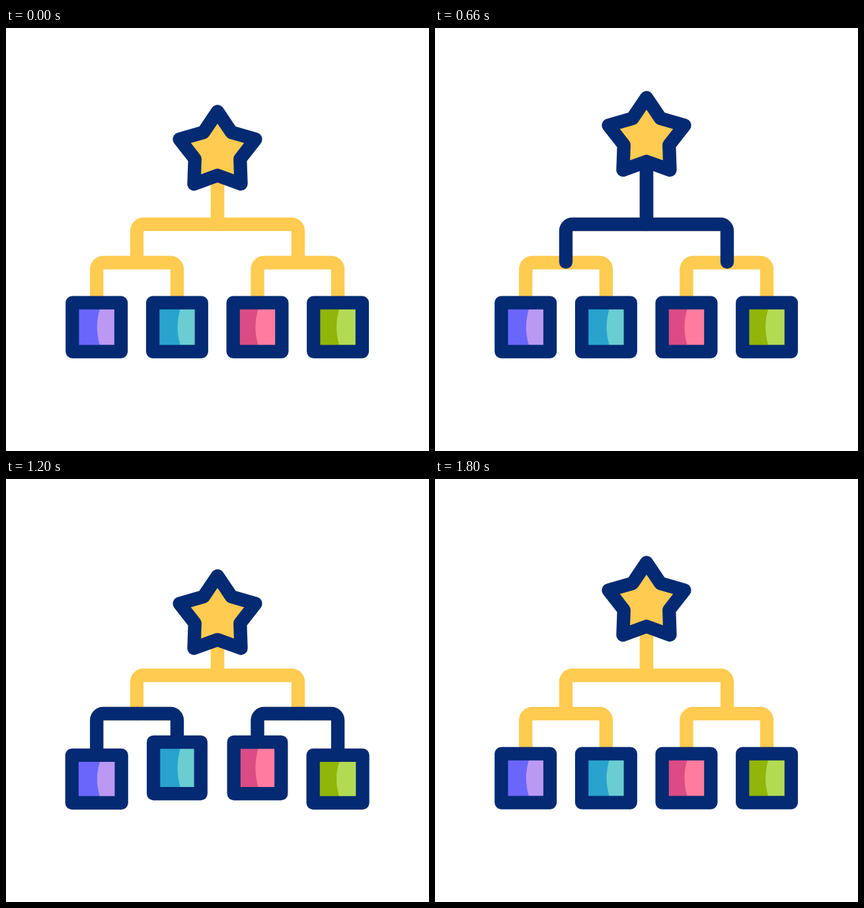
Animation, 640 px wide and 640 px high, one loop 1.88 s. Source, as an HTML page with a canvas:

```html
<!DOCTYPE html>
<html lang="en">
<head>
<meta charset="utf-8">
<title>Hierarchy</title>
<style>
  html, body { margin: 0; height: 100%; overflow: hidden; background: #fff; }
  canvas { display: block; width: 100vw; height: 100vh; }
</style>
</head>
<body>
<canvas width="640" height="640"></canvas>
<script>
const ctx = document.querySelector('canvas').getContext('2d');
const LOOP = 1880, STEP = 20, STROKE = 20.3;
const NAVY = '#032a73', YELLOW = '#ffcb50';

// Keyframes as [time, value]
const STAR_Y = [[200, 0], [340, 18.7], [820, -35], [1220, 20.5], [1520, -7], [1800, 0]];
const BOX_Y = [[700, 0], [1020, -33], [1270, 9.5], [1540, 0]];
const BOX_W = [[700, 0], [1020, -4], [1270, 4], [1540, 0]];
const BOX_H = [[700, 0], [1020, 7.5], [1270, -7], [1540, 0]];
const INNER_DELAY = 70, SCALE_LAG = 30;

// Start and end time of the wave's head and tail on each level
const UPPER = { head: [400, 660], tail: [880, 1165] };
const LOWER = { head: [660, 840], tail: [1200, 1380] };

const BOXES = [
  { x: 137.2, dark: '#6b66fb', light: '#bb99f3', shine: 4.7, delay: 0 },
  { x: 258.9, dark: '#29a3cd', light: '#69cdd1', shine: 4.7, delay: INNER_DELAY },
  { x: 380.5, dark: '#db4c84', light: '#ff7c9f', shine: 1, delay: INNER_DELAY },
  { x: 502.1, dark: '#91b508', light: '#b2db53', shine: 2, delay: 0 }
];

const ease = p => {
  p = Math.min(1, Math.max(0, p));
  return p * p * (3 - 2 * p);
};
const progress = (t, [from, to]) => ease((t - from) / (to - from));

function track(keys, t) {
  let value = keys[0][1];
  for (let i = 1; i < keys.length; i++) {
    const [t0, v0] = keys[i - 1], [t1, v1] = keys[i];
    value += (v1 - v0) * progress(t, [t0, t1]);
  }
  return value;
}

// A branch runs along y from x0 to x1, then turns down to its end
function branch(x0, x1, top, y, bottom) {
  const path = new Path2D();
  path.moveTo(x0, top);
  path.lineTo(x0, y);
  path.arcTo(x1, y, x1, bottom, 10);
  path.lineTo(x1, bottom);
  const length = (y - top) + Math.abs(x1 - x0) + (bottom - y) - 20 + 5 * Math.PI;
  return { path, length };
}

const upper = [198, 442].map(x => branch(320, x, 185, 297, 354));
const lower = BOXES.map((box, i) => branch(i < 2 ? 198 : 442, box.x, 355, 355, 430));

function drawWave({ path, length }, t, { head, tail }) {
  const start = progress(t, tail) * length;
  const end = progress(t, head) * length;
  if (end - start < 0.1) return;
  ctx.setLineDash([end - start, 2 * length]);
  ctx.lineDashOffset = -start;
  ctx.stroke(path);
  ctx.setLineDash([]);
}

function drawLines(t) {
  ctx.strokeStyle = YELLOW;
  ctx.lineCap = 'butt';
  for (const line of [...upper, ...lower]) ctx.stroke(line.path);
  ctx.strokeStyle = NAVY;
  ctx.lineCap = 'round';
  upper.forEach(line => drawWave(line, t, UPPER));
  lower.forEach(line => drawWave(line, t, LOWER));
}

function drawBox(box, t) {
  t -= box.delay;
  const y = 452.6 + track(BOX_Y, t);
  const w = 73.7 + track(BOX_W, t - SCALE_LAG);
  const h = 74 + track(BOX_H, t - SCALE_LAG);
  const left = box.x - w / 2, top = y - h / 2;
  const edge = box.x + box.shine, inset = h / 2 - 10;
  ctx.fillStyle = box.dark;
  ctx.fillRect(left, top, w, h);
  ctx.fillStyle = box.light;
  ctx.beginPath();
  ctx.moveTo(left + w, y - inset);
  ctx.lineTo(edge, y - inset);
  ctx.quadraticCurveTo(edge - 8, y, edge, y + inset);
  ctx.lineTo(left + w, y + inset);
  ctx.fill();
  ctx.strokeRect(left, top, w, h);
}

function drawStar(t) {
  const y = 187 + track(STAR_Y, t);
  ctx.beginPath();
  for (let i = 0; i < 10; i++) {
    const radius = i % 2 ? 36 : 60.5, angle = (i / 5 - 0.5) * Math.PI;
    ctx.lineTo(320 + radius * Math.cos(angle), y + radius * Math.sin(angle));
  }
  ctx.closePath();
  ctx.fillStyle = YELLOW;
  ctx.fill();
  ctx.stroke();
}

function draw(now) {
  const t = Math.floor(now % LOOP / STEP) * STEP;
  ctx.fillStyle = '#fff';
  ctx.fillRect(0, 0, 640, 640);
  ctx.lineWidth = STROKE;
  ctx.lineJoin = 'round';
  drawLines(t);
  BOXES.forEach(box => drawBox(box, t));
  drawStar(t);
}

const begin = performance.now();
function tick() {
  draw(performance.now() - begin);
  requestAnimationFrame(tick);
}
tick();
</script>
</body>
</html>
```
